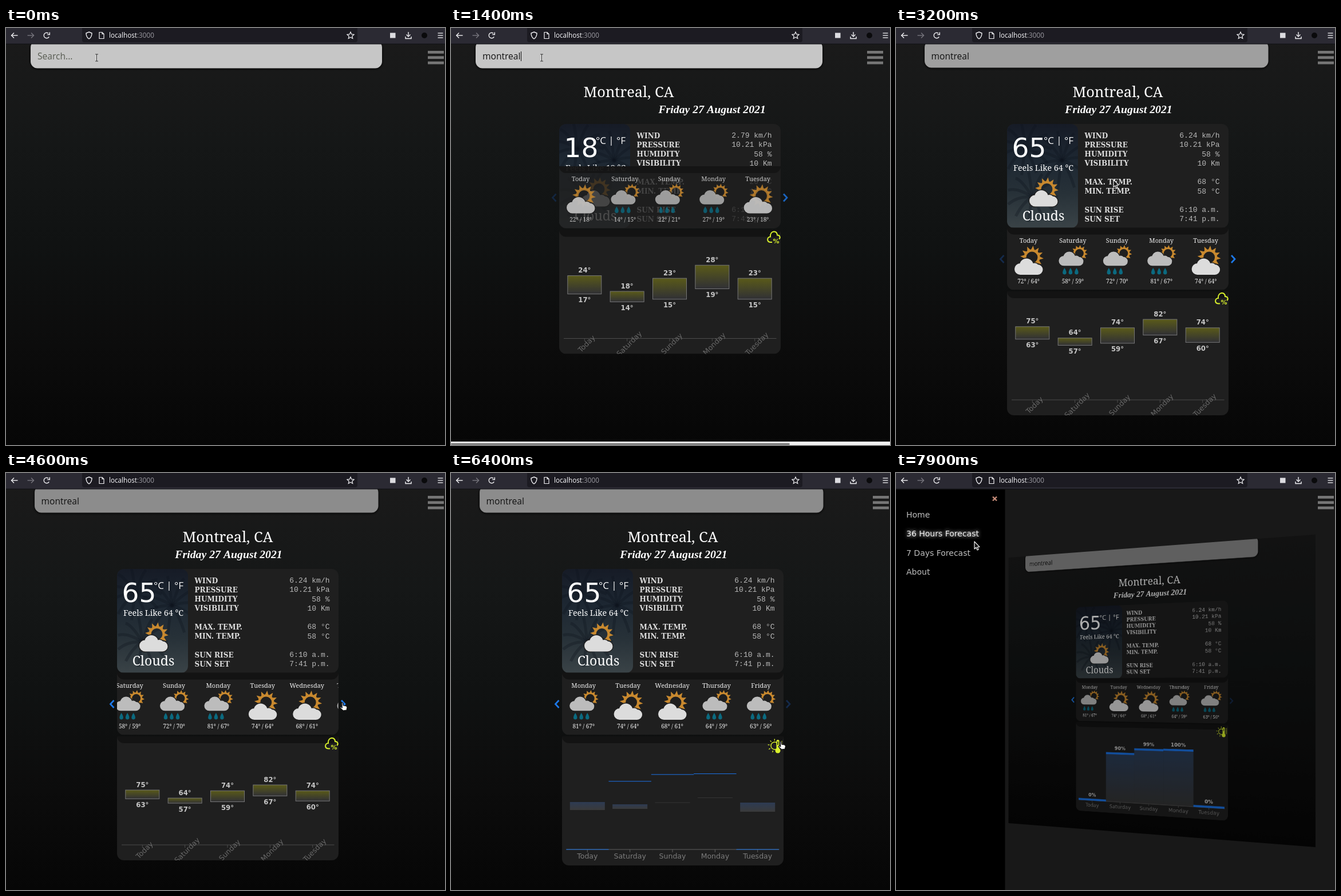
Write an HTML page with a canvas that moves like this. It is 767 px wide and 730 px high and loops after 8000 ms.

```html
<!DOCTYPE html>
<html lang="en">
<head>
<meta charset="utf-8">
<title>Weather</title>
<style>
html, body { margin: 0; width: 100%; height: 100%; overflow: hidden; background: #181818; }
#stage { position: relative; width: 767px; height: 730px; overflow: hidden; background: #181818; }
canvas { position: absolute; left: 0; top: 0; transform-origin: 0 0; }
</style>
</head>
<body>
<div id="stage">
  <canvas id="page" width="778" height="705"></canvas>
  <canvas id="top" width="767" height="730"></canvas>
</div>
<script>
const pageEl = document.getElementById('page');
const page = pageEl.getContext('2d');
const over = document.getElementById('top').getContext('2d');

const LOOP = 8000, STEP = 100, BAR = 28;
const SERIF = '"Noto Serif", serif', SANS = '"Open Sans", sans-serif';
const DEJA = '"DejaVu Sans", sans-serif', DEJA_SERIF = '"DejaVu Serif", serif';
const MONO = '"Liberation Mono", monospace';
const PANEL = '#1f1f1f', BAND = '#131313', BLUE = '#1b72e6', LIME = '#d8f02c';

const DAYS = ['Today', 'Saturday', 'Sunday', 'Monday', 'Tuesday', 'Wednesday', 'Thursday', 'Friday'];
const RAINY = [0, 1, 1, 1, 0, 0, 1, 1];
const WEEK_C = ['22/18', '14/15', '22/21', '27/19', '23/18', '20/16', '18/15', '17/13'];
const WEEK_F = ['72/64', '58/59', '72/70', '81/67', '74/64', '68/61', '64/59', '63/56'];
const RANGE_C = [[24, 17], [18, 14], [23, 15], [28, 19], [23, 15]];
const RANGE_F = [[75, 63], [64, 57], [74, 59], [82, 67], [74, 60]];
const RAIN = [0, 90, 99, 100, 0];
const FADING = [[576, 14], [580, 8], [576.5, 1], [568, 1], [577, 16]];
const CLICKS = [4300, 4600, 4800, 5100, 5200];

// time, x, y, shape
const POINTER = [
  [0, 158, 52, 'beam'], [1600, 158, 52, 'beam'], [1700, 190, 90, 'arrow'], [2000, 321, 177, 'arrow'],
  [2500, 300, 196, 'hand'], [3000, 300, 196, 'arrow'], [3500, 500, 370, 'arrow'], [3600, 568, 408, 'arrow'],
  [3800, 568, 408, 'arrow'], [3900, 586, 405, 'arrow'], [4000, 586, 405, 'arrow'], [4100, 586, 402, 'hand'],
  [5000, 587, 402, 'hand'], [5100, 520, 540, 'arrow'], [5200, 420, 632, 'arrow'], [5300, 420, 632, 'arrow'],
  [5700, 292, 600, 'arrow'], [6200, 575, 470, 'hand'], [6400, 575, 470, 'hand'], [6500, 708, 262, 'arrow'],
  [6600, 708, 262, 'arrow'], [6700, 718, 56, 'hand'], [7400, 718, 56, 'hand'], [7500, 630, 150, 'arrow'],
  [7900, 137, 120, 'arrow']
];

const mix = (a, b, p) => a + (b - a) * p;
const span = (t, a, b) => Math.min(1, Math.max(0, (t - a) / (b - a)));
const inOut = p => p < .5 ? 2 * p * p : 1 - 2 * (1 - p) ** 2;
const out = p => 1 - (1 - p) ** 3;

function text(c, s, x, y, font, color, align = 'left') {
  c.font = font;
  c.fillStyle = color;
  c.textAlign = align;
  c.fillText(s, x, y);
}

function box(c, x, y, w, h, r, color) {
  c.beginPath();
  c.roundRect(x, y, w, h, r);
  c.fillStyle = color;
  c.fill();
}

function line(c, pts, color, width) {
  c.beginPath();
  pts.forEach(([x, y]) => c.lineTo(x, y));
  c.strokeStyle = color;
  c.lineWidth = width;
  c.stroke();
}

function ring(c, x, y, r, color, width, from = 0, to = 7) {
  c.beginPath();
  c.arc(x, y, r, from, to);
  c.strokeStyle = color;
  c.lineWidth = width;
  c.stroke();
}

function fade(c, y0, y1, ...colors) {
  const g = c.createLinearGradient(0, y0, 0, y1);
  colors.forEach((k, i) => g.addColorStop(i / (colors.length - 1), k));
  return g;
}

function shape(c, x, y, pts, fill, stroke) {
  c.beginPath();
  pts.forEach(([px, py]) => c.lineTo(x + px, y + py));
  c.closePath();
  c.fillStyle = fill;
  c.fill();
  c.lineJoin = 'round';
  c.strokeStyle = stroke;
  c.lineWidth = 1.2;
  c.stroke();
  c.lineJoin = 'miter';
}

/* weather icons */

function sun(c, x, y, r, tip) {
  ring(c, x, y, r, '#c8892f', r * .34);
  c.fillStyle = '#c8892f';
  for (let i = 0; i < 12; i++) {
    const a = i * Math.PI / 6 + .1;
    c.beginPath();
    c.moveTo(x + Math.cos(a) * tip, y + Math.sin(a) * tip);
    c.lineTo(x + Math.cos(a - .23) * r * 1.1, y + Math.sin(a - .23) * r * 1.1);
    c.lineTo(x + Math.cos(a + .23) * r * 1.1, y + Math.sin(a + .23) * r * 1.1);
    c.fill();
  }
}

function cloud(c, x, y, s, color) {
  const puffs = [[10, 18.5, 10], [21, 12, 12], [35, 16, 8], [40.5, 19.5, 9]];
  const blob = (grow, fill) => {
    c.fillStyle = fill;
    c.beginPath();
    for (const [px, py, r] of puffs) {
      c.moveTo(x + px * s, y + py * s);
      c.arc(x + px * s, y + py * s, r * s + grow, 0, 7);
    }
    c.rect(x + 10 * s, y + 14 * s, 30 * s, 14.5 * s);
    c.fill();
  };
  blob(1.4, PANEL);
  blob(0, color);
}

function icon(c, x, y, rainy) {
  if (!rainy) {
    sun(c, x + 30.5, y + 20, 12, 20.5);
    cloud(c, x, y + 22, 1, '#dcdcdc');
    return;
  }
  sun(c, x + 36, y + 13, 9, 14.5);
  cloud(c, x, y + 10, .87, '#bcbcbc');
  c.fillStyle = '#0b6a80';
  for (const dx of [10, 20.5, 31]) {
    c.beginPath();
    c.moveTo(x + dx, y + 38.5);
    c.quadraticCurveTo(x + dx + 5, y + 46, x + dx + 2.5, y + 49);
    c.quadraticCurveTo(x + dx, y + 51, x + dx - 2.5, y + 49);
    c.quadraticCurveTo(x + dx - 5, y + 46, x + dx, y + 38.5);
    c.fill();
  }
}

/* page parts */

function searchBox(c, t, narrow) {
  const p = out(span(t, 1700, 2500)), q = span(t, 2600, 3500);
  const left = mix(43, 50, p), right = narrow ? 649 : mix(657, 650.5, p);
  const g = Math.round(mix(198, 140, q));
  c.save();
  c.shadowColor = '#000';
  c.shadowBlur = 5;
  c.shadowOffsetY = 1;
  box(c, left, 22, right - left, mix(48.5, 47.5, p), 12, `rgb(${g},${g},${g})`);
  c.restore();
  const typed = t >= 300;
  text(c, typed ? 'montreal' : 'Search...', left + mix(12, 11.5, p), 55, '15.6px ' + SANS, typed ? '#111' : '#585c52');
  if (typed && t < 1700) line(c, [[122.5, 41], [122.5, 58]], '#111', 1);
}

function photo(c) {
  c.save();
  c.beginPath();
  c.roundRect(194, 168, 124, 182, 12);
  c.clip();
  c.fillStyle = fade(c, 168, 350, '#161b26', '#1d2732', '#273138', '#3a4347');
  c.fillRect(194, 168, 124, 182);
  for (const [x, y, r] of [[226, 212, 46], [290, 232, 52], [238, 296, 44]]) {
    for (let i = 0; i < 11; i++) {
      const a = i * .57;
      c.beginPath();
      c.moveTo(x, y);
      c.quadraticCurveTo(x + Math.cos(a) * r * .6, y + Math.sin(a) * r * .6 - 10, x + Math.cos(a) * r, y + Math.sin(a) * r);
      c.strokeStyle = 'rgba(15,19,28,.32)';
      c.lineWidth = 5;
      c.stroke();
    }
  }
  c.restore();
}

function card(c, hot) {
  box(c, 194, 168, 387, 182, 12, PANEL);
  photo(c);
  text(c, hot ? '65' : '18', 232.5, 226, '47px ' + DEJA, '#fff', 'center');
  text(c, '°C', 258, 203, '17px ' + SANS, '#fff');
  text(c, '|', 285, 202, '17px ' + SANS, '#fff', 'center');
  text(c, '°F', 294, 203, '17px ' + SANS, '#fff');
  text(c, `Feels Like ${hot ? 64 : 18} °C`, 257.5, 250, '14.3px ' + SERIF, '#fff', 'center');
  icon(c, 233, 262, 0);
  text(c, 'Clouds', 257.5, 337, '23px ' + SERIF, '#fff', 'center');
  const rows = [
    ['WIND', hot ? '6.24 km/h' : '2.79 km/h'], ['PRESSURE', '10.21 kPa'], ['HUMIDITY', '58 %'],
    ['VISIBILITY', '10 Km'], null, ['MAX. TEMP.', hot ? '68 °C' : '20 °C'],
    ['MIN. TEMP.', hot ? '58 °C' : '15 °C'], null, ['SUN RISE', '6:10 a.m.'], ['SUN SET', '7:41 p.m.']
  ];
  rows.forEach((row, i) => {
    if (!row) return;
    const y = 192.5 + i * 16.25;
    text(c, row[0], 329.5, y, 'bold 12.1px ' + DEJA_SERIF, '#dcdcdc');
    text(c, row[1], 565.5, y - .5, '13px ' + MONO, '#b9b9b9', 'right');
  });
}

function panel(c, y, h) {
  c.save();
  c.beginPath();
  c.roundRect(194, y, 387, h, [0, 0, 12, 12]);
  c.clip();
  c.fillStyle = PANEL;
  c.fillRect(194, y, 387, h);
  box(c, 194, y - 20, 387, 32, 12, BAND);
  c.restore();
}

function forecast(c, t, hot) {
  const clicks = CLICKS.filter(k => t >= k).length, shift = clicks * 46.4;
  panel(c, 349.5, 109);
  c.save();
  c.beginPath();
  c.rect(194, 349, 386.5, 109);
  c.clip();
  DAYS.forEach((day, i) => {
    const x = 231.5 + i * 77.4 - shift;
    if (x < 150 || x > 640) return;
    const [hi, lo] = (hot ? WEEK_F : WEEK_C)[i].split('/');
    text(c, day, x, 375.5, '11px ' + SERIF, '#f0f0f0', 'center');
    icon(c, x - 24.5, 381.5, RAINY[i]);
    text(c, `${hi}° / ${lo}°`, x, 446.5, '10px ' + SERIF, '#f0f0f0', 'center');
  });
  c.restore();
  const on = '#1d78e8', off = '#142a4b';
  line(c, [[188.5, 398], [182.5, 404.5], [188.5, 411]], clicks ? on : off, 2.8);
  line(c, [[586, 398], [592, 404.5], [586, 411]], clicks < 5 ? on : off, 2.8);
}

function rainToggle(c) {
  c.beginPath();
  c.moveTo(566, 482.5);
  c.lineTo(563, 482.5);
  c.bezierCurveTo(556, 482, 557, 473, 563, 473);
  c.bezierCurveTo(562, 462, 575, 461, 575, 470);
  c.bezierCurveTo(580, 470, 581, 475, 578, 477);
  c.strokeStyle = LIME;
  c.lineWidth = 2;
  c.stroke();
  text(c, '%', 573, 484, 'bold 11px ' + DEJA, LIME, 'center');
}

function sunToggle(c) {
  ring(c, 565.5, 477.5, 6.5, LIME, 1.4, .8, 5.5);
  for (let i = 1; i < 8; i++) {
    const a = .5 + i * .7, x = Math.cos(a), y = Math.sin(a);
    line(c, [[565.5 + x * 9, 477.5 + y * 9], [565.5 + x * 12, 477.5 + y * 12]], LIME, 1.3);
  }
  box(c, 568.5, 467, 5, 19, 2.5, LIME);
  c.beginPath();
  c.arc(571, 486, 4.5, 0, 7);
  c.fill();
  line(c, [[571, 470], [571, 476]], PANEL, 1.6);
  for (let y = 470; y < 483; y += 3) line(c, [[575.5, y], [579, y]], LIME, 1);
}

const slot = i => 238.3 + i * 74.35;

function axis(c, y, color) {
  line(c, [[202, y], [573.5, y]], color, 1.2);
  for (let i = 0; i < 5; i++) line(c, [[slot(i), y], [slot(i), y + 5]], color, 1);
}

function tempChart(c, t, hot) {
  panel(c, 461, 217);
  const p = inOut(span(t, 2600, 3500)), k = mix(4.58, 1.28, p);
  c.save();
  c.beginPath();
  c.rect(194, 461, 387, 217);
  c.clip();
  axis(c, 651, '#4c4c4c');
  RANGE_C.forEach((r, i) => {
    const x = slot(i), n = hot ? RANGE_F[i] : r;
    const [y0, y1] = [0, 1].map(j => 651 - k * mix(r[j], RANGE_F[i][j], p));
    c.fillStyle = fade(c, y0, y1, '#5a5a19', '#303035');
    c.fillRect(x - 29.5, y0, 59, y1 - y0);
    c.strokeStyle = '#777';
    c.lineWidth = 1;
    c.strokeRect(x - 29.5, y0, 59, y1 - y0);
    text(c, n[0] + '°', x, y0 - 5.5, 'bold 11.7px ' + DEJA, '#c6c6c6', 'center');
    text(c, n[1] + '°', x, y1 + 14.5, 'bold 11.7px ' + DEJA, '#c6c6c6', 'center');
    c.save();
    c.translate(x + 3.5, 660);
    c.rotate(-Math.PI / 4);
    text(c, DAYS[i], 0, 4.5, '12.5px ' + DEJA, '#686868', 'center');
    c.restore();
  });
  c.restore();
  rainToggle(c);
}

function rainChart(c, t) {
  panel(c, 461, 226);
  const p = inOut(span(t, 6400, 7200));
  RAIN.forEach((v, i) => {
    const x = slot(i), y = 659 - v * 1.325, h = mix(1, 5, p);
    c.globalAlpha = p;
    c.fillStyle = fade(c, y, 659, '#2a3d58', '#353535');
    c.fillRect(x - 37.2, y, 74.4, 659 - y);
    c.globalAlpha = 1;
    if (t < 6700) {
      const [fy, fh] = FADING[i];
      c.globalAlpha = 1 - p;
      c.fillStyle = fh > 1 ? fade(c, fy, fy + fh, '#2d3b53', '#3a3a3a') : '#343434';
      c.fillRect(x - 30.5, fy, 61, fh);
      c.globalAlpha = 1;
    }
  });
  axis(c, 659, '#606060');
  RAIN.forEach((v, i) => {
    const x = slot(i), y = 659 - v * 1.325, h = mix(1, 5, p);
    c.fillStyle = BLUE;
    c.fillRect(x - 37.2, y + .5 - h, 74.4, h);
    text(c, DAYS[i], x, 674.5, '12.5px ' + DEJA, '#7c7c7c', 'center');
    if (t >= 7200) text(c, v + '%', x, y - 10.5, 'bold 12px ' + DEJA, '#d0d0d0', 'center');
  });
  sunToggle(c);
}

function drawPage(t) {
  const c = page, narrow = t >= 600 && t < 1600, hot = t >= 2700;
  c.setTransform(1, 0, 0, 1, 0, -BAR);
  c.fillStyle = fade(c, BAR, 730, '#1a1a1a', '#151717', '#101212', '#0c0c0c', '#060606');
  c.fillRect(0, BAR, 778, 705);
  if (t >= 600) {
    const off = 730 * (1 - inOut(span(t, 700, 1600)));
    const drop = -107.5 * (1 - out(span(t, 1400, 2150)));
    c.save();
    c.translate(narrow ? -5 : 0, 0);
    text(c, 'Montreal, CA', 387.5 - off, 121, '25.4px ' + SERIF, '#fff', 'center');
    text(c, 'Friday 27 August 2021', 389 + off, 148.5, 'italic bold 19.8px "Liberation Serif", serif', '#fff', 'center');
    card(c, hot);
    c.translate(0, drop);
    if (t < 6300) tempChart(c, t, hot);
    else rainChart(c, t);
    c.globalAlpha = span(t, 600, 1600);
    forecast(c, t, hot);
    c.restore();
  }
  searchBox(c, t, narrow);
  if (narrow) {
    const off = 730 * (1 - inOut(span(t, 700, 1600)));
    c.fillStyle = '#f4f4f4';
    c.fillRect(0, 724, 767, 6);
    box(c, 0, 726.5, 767 * 767 / (767 + Math.min(757, off * 3.15)), 3.5, 2, '#858585');
  }
}

// Projects the page onto a quad with upright sides.
function tilt(p) {
  const W = 778, H = 705;
  const [x0, top0, end0, x1, top1, end1] =
    [[0, 196.5], [BAR, 148], [733, 613], [W, 733], [BAR, 107.5], [733, 655]].map(([a, b]) => mix(a, b, p));
  const w = (end0 - top0) / (end1 - top1);
  const m = [(x1 * w - x0) / W, (top1 * w - top0) / W, 0, (w - 1) / W,
    0, (end0 - top0) / H, 0, 0, 0, 0, 1, 0, x0, top0, 0, 1];
  pageEl.style.transform = `matrix3d(${m.map(v => v.toFixed(9)).join()})`;
  pageEl.style.filter = p ? `brightness(${1 - .32 * p})` : 'none';
}

/* browser bar, menu, pointer */

function toolbar(c) {
  const ink = '#f0f0f3', soft = '#77767e';
  c.fillStyle = '#2b2a33';
  c.fillRect(0, 0, 767, BAR);
  c.fillStyle = '#0f0f12';
  c.fillRect(0, BAR - .5, 767, 1);
  box(c, 133, -6, 481, 31, 4, '#1c1b22');
  for (const [x, d, k] of [[15, -1, ink], [43, 1, soft]]) {
    line(c, [[x - 5.5, 13], [x + 5.5, 13]], k, 1.4);
    line(c, [[x + d, 8.5], [x + d * 5.5, 13], [x + d, 17.5]], k, 1.4);
  }
  ring(c, 71, 13, 4.8, ink, 1.4, .5, 5.4);
  line(c, [[76.3, 7.5], [76.3, 11.5], [72.3, 11.5]], ink, 1.4);
  c.beginPath();
  c.moveTo(145, 7);
  c.lineTo(150, 9);
  c.quadraticCurveTo(150, 16, 145, 19);
  c.quadraticCurveTo(140, 16, 140, 9);
  c.closePath();
  c.stroke();
  line(c, [[163, 7.5], [168, 7.5], [171, 10.5], [171, 18.5], [163, 18.5], [163, 7]], ink, 1.2);
  line(c, [[168, 7.5], [168, 10.5], [171, 10.5]], ink, 1.2);
  text(c, 'localhost', 180, 17, '11.7px ' + SANS, '#fbfbfe');
  text(c, ':3000', 180 + c.measureText('localhost').width, 17, '11.7px ' + SANS, '#9a99a0');
  c.beginPath();
  for (let i = 0; i < 10; i++) {
    const a = i * Math.PI / 5 - Math.PI / 2, r = i % 2 ? 2.9 : 6.3;
    c.lineTo(602 + Math.cos(a) * r, 13.3 + Math.sin(a) * r);
  }
  c.closePath();
  c.stroke();
  box(c, 671, 8.5, 9.5, 9, 0, '#dcdce0');
  line(c, [[703, 7], [703, 14.5]], ink, 1.4);
  line(c, [[699.5, 11.5], [703, 15], [706.5, 11.5]], ink, 1.4);
  line(c, [[698, 15], [698, 18.5], [708, 18.5], [708, 15]], ink, 1.4);
  c.beginPath();
  c.arc(731, 13, 5, 0, 7);
  c.fillStyle = '#0a0a0c';
  c.fill();
  for (const y of [9, 13, 17]) line(c, [[754.5, y], [763.5, y]], ink, 1.3);
}

function menu(c, t) {
  c.fillStyle = '#000';
  c.fillRect(0, BAR + 1, 190.5, 702);
  line(c, [[169, 41.5], [176, 48.5]], '#c58a78', 2.4);
  line(c, [[176, 41.5], [169, 48.5]], '#c58a78', 2.4);
  ['Home', '36 Hours Forecast', '7 Days Forecast', 'About'].forEach((s, i) => {
    const lit = i === 1 && t >= 7900;
    c.save();
    if (lit) {
      c.shadowColor = '#fff';
      c.shadowBlur = 6;
    }
    text(c, s, 18, 78 + i * 33.3, '14px ' + DEJA, lit ? '#f2f2f2' : '#bdbdbd');
    c.restore();
  });
}

function pointer(c, t) {
  const i = POINTER.findLastIndex(k => k[0] <= t);
  const a = POINTER[i], b = POINTER[i + 1] || a;
  const p = b === a ? 0 : span(t, a[0], b[0]);
  const x = mix(a[1], b[1], p), y = mix(a[2], b[2], p);
  if (a[3] === 'beam') {
    for (const [k, w] of [['#eee', 2.4], ['#222', 1]]) {
      line(c, [[x + .5, y - 6], [x + .5, y + 6]], k, w);
      for (const d of [-6, 6]) line(c, [[x - 2, y + d], [x + 3, y + d]], k, 1);
    }
  } else if (a[3] === 'arrow') {
    shape(c, x, y, [[0, 0], [0, 13], [3, 10.3], [5, 15], [7.2, 14], [5.2, 9.5], [9, 9.3]], '#161616', '#f2f2f2');
  } else {
    shape(c, x, y, [[0, 0], [2, 0], [2.6, 5], [8, 6], [9.5, 8], [8.5, 13], [2.5, 14], [-3, 9], [-2, 7.5], [.8, 9]], '#fff', '#111');
  }
}

function drawTop(t) {
  const c = over, x = t >= 600 && t < 1600 ? 727 : 737;
  c.clearRect(0, 0, 767, 730);
  c.fillStyle = '#767676';
  for (const y of [40, 49.3, 58.6]) c.fillRect(x, y, 28, 4.8);
  if (t >= 7500) menu(c, t);
  toolbar(c);
  pointer(c, t);
}

// The picture advances ten times a second.
let shown = -1;
function frame(now) {
  const t = Math.floor(now % LOOP / STEP) * STEP;
  if (t !== shown) {
    shown = t;
    drawPage(t);
    tilt(span(t, 7300, 7500) ** 3);
    drawTop(t);
  }
  requestAnimationFrame(frame);
}
const start = performance.now();
const tick = () => { frame(performance.now() - start); };
requestAnimationFrame(function run() {
  const t = Math.floor((performance.now() - start) % LOOP / STEP) * STEP;
  if (t !== shown) {
    shown = t;
    drawPage(t);
    tilt(span(t, 7300, 7500) ** 3);
    drawTop(t);
  }
  requestAnimationFrame(run);
});
</script>
</body>
</html>
```
